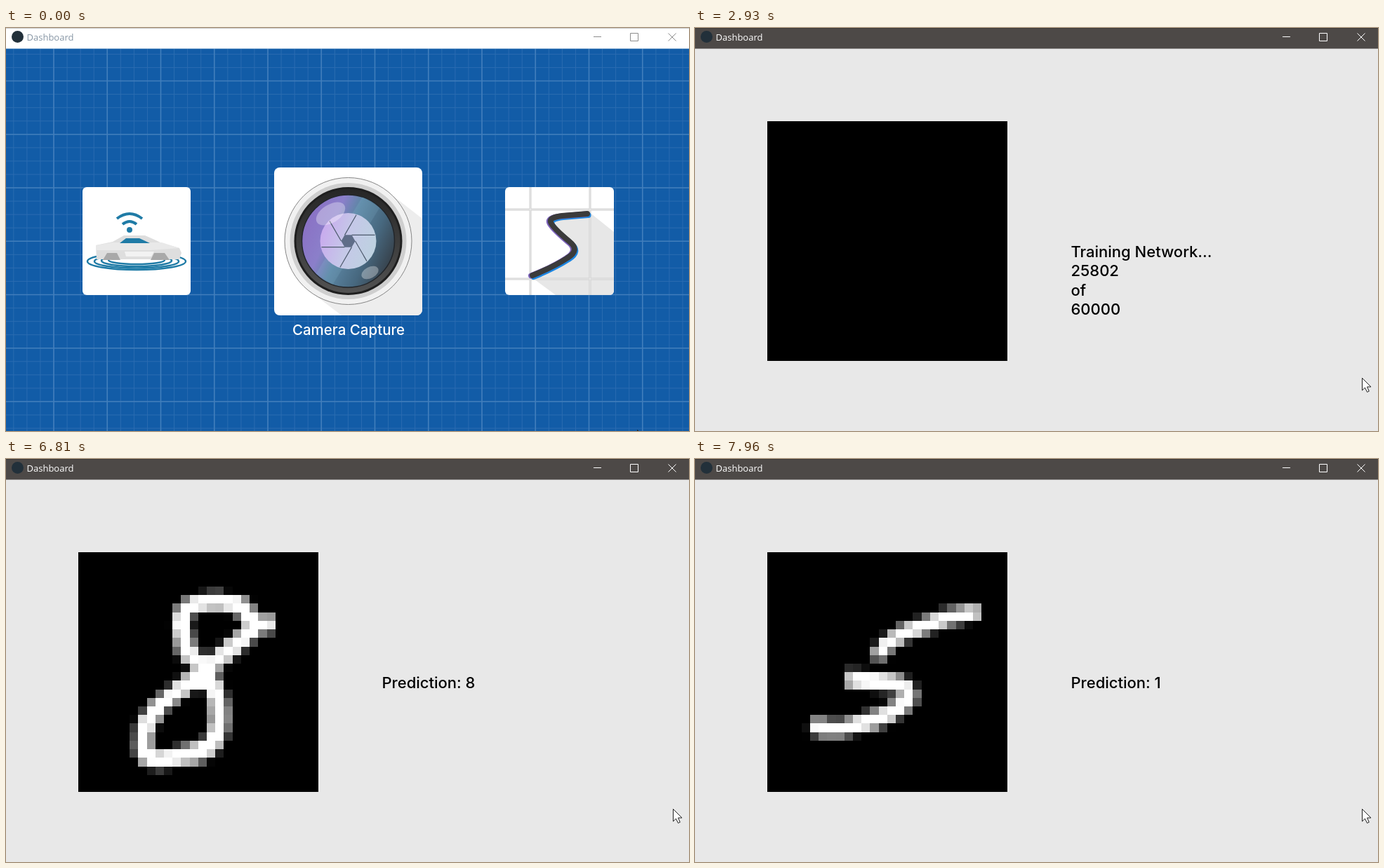
These frames come from a looping animation (973 by 575 pixels, 8000 ms). An HTML page with a canvas:

```html
<!DOCTYPE html>
<html lang="en">
<head>
<meta charset="utf-8">
<title>Dashboard</title>
<style>
  html, body { margin: 0; width: 973px; height: 575px; overflow: hidden; background: #e8e8e8; }
  svg, canvas { position: absolute; display: block; }
  svg { left: 0; top: 0; }
  canvas { left: 103px; top: 133px; }
  text { font: 500 22px Inter, sans-serif; white-space: pre; }
  #title { font: 13px "Open Sans", "Noto Sans", sans-serif; }
  #label { font-size: 20.5px; fill: #fff; text-anchor: middle; }
</style>
</head>
<body>
<svg width="973" height="575" viewBox="0 0 973 575">
  <defs>
    <linearGradient id="lens" x1="0" y1=".3" x2="1" y2=".75">
      <stop offset="0" stop-color="#8a70c4"/><stop offset=".28" stop-color="#8b7fca"/>
      <stop offset=".45" stop-color="#5c86a4"/><stop offset=".72" stop-color="#47687f"/>
      <stop offset="1" stop-color="#343b43"/>
    </linearGradient>
    <linearGradient id="glass" x1="0" y1=".3" x2="1" y2=".6">
      <stop offset="0" stop-color="#c9a9ee"/><stop offset=".5" stop-color="#c5c8e8"/>
      <stop offset="1" stop-color="#bdd2e0"/>
    </linearGradient>
    <linearGradient id="barrel" x2="0" y2="1">
      <stop offset="0" stop-color="#262626"/><stop offset="1" stop-color="#525252"/>
    </linearGradient>
    <clipPath id="cameraClip"><rect x="382" y="199" width="211" height="211" rx="8"/></clipPath>
    <clipPath id="strokeClip"><rect x="711" y="227" width="155" height="154" rx="6"/></clipPath>
    <path id="squiggle" d="M828 265L792 268Q774 270 776 277Q778 284 803 305Q818 317 800 328Q780 341 750 353"
      fill="none" stroke-width="8" stroke-linecap="round" stroke-linejoin="round"/>
  </defs>

  <g id="menu">
    <rect y="29" width="973" height="546" fill="#125ca7"/>
    <path id="minor" stroke="#2b6cb1"/>
    <path id="major" stroke="#417ebc" stroke-width="1.6"/>

    <g class="card">
      <rect x="109" y="227" width="154" height="154" rx="6" fill="#fff"/>
      <g fill="none" stroke="#1f7ba6">
        <g stroke-width="4"><path d="M158 272Q176 258 194 272M166 280Q176 272 186 280"/></g>
        <circle cx="176" cy="288" r="3" fill="#1f7ba6" stroke-width="2"/>
        <g stroke-width="2.5">
          <ellipse cx="186" cy="333" rx="70" ry="12"/><ellipse cx="186" cy="333" rx="60" ry="9.5"/>
          <ellipse cx="186" cy="332" rx="50" ry="8"/><ellipse cx="186" cy="331" rx="40" ry="6"/>
        </g>
      </g>
      <path d="M128 310L152 305 168 296H198Q212 302 222 307L247 314 250 321 247 330H129Z" fill="#dedede"/>
      <path d="M128 310L152 306H222L247 314 206 317H128Z" fill="#e9e9e9"/>
      <path d="M162 307L171 300H190L205 307Z" fill="#1f7ba6"/>
      <path d="M138 331L144 321H158L163 331ZM206 331L211 321H226L233 331Z" fill="#a9a9a9"/>
      <path d="M169 319H211L207 326H171Z" fill="#f2f2f2"/>
    </g>

    <g class="card" clip-path="url(#cameraClip)">
      <rect x="382" y="199" width="211" height="211" fill="#fff"/>
      <path d="M552 240L593 272V410H478L424 369Z" fill="#ededed"/>
      <g transform="translate(487.5 304)">
        <circle r="90.5" fill="#f1f1f1" stroke="#858585"/>
        <circle r="83" fill="#cfcfcf"/>
        <circle r="77" fill="#1f1f1f"/>
        <circle r="74" fill="url(#barrel)"/>
        <circle r="66" fill="url(#lens)" stroke="#22262b" stroke-width="1.5"/>
        <path d="M-46 47L20 -63 45 -48 -22 62Z" fill="#9ad0e2" opacity=".13"/>
        <circle r="40" fill="url(#glass)"/>
        <g id="blades" stroke="#4d5a6c" stroke-width="1.2"></g>
        <path d="M10 0L5 8.7H-5L-10 0 -5 -8.7H5Z" fill="#5f6d88"/>
        <ellipse cx="-25" cy="-39" rx="23" ry="13" transform="rotate(-32 -25 -39)" fill="#fff" opacity=".32"/>
        <ellipse cx="31" cy="45" rx="13" ry="8" transform="rotate(-28 31 45)" fill="#fff" opacity=".32"/>
      </g>
    </g>

    <g class="card" clip-path="url(#strokeClip)">
      <rect x="711" y="227" width="155" height="154" fill="#fff"/>
      <path d="M830 262L866 291V381H783L748 355 812 318 776 275Z" fill="#e7e7e7"/>
      <path d="M747 227V381M832 227V381M711 259H866M711 358H866" stroke="#cfcfcf" stroke-width="3"/>
      <path d="M747 227V381M832 227V381M711 259H866M711 358H866" stroke="#eee"/>
      <use href="#squiggle" x="1.5" y="2" stroke="#1c86e2"/>
      <use href="#squiggle" x="-2" y=".5" stroke="#7d63bd"/>
      <use href="#squiggle" stroke="#3b3b3b"/>
    </g>
    <text id="label" x="488" y="438"></text>
  </g>

  <g id="lines"></g>

  <rect id="bar" width="973" height="29.5"/>
  <path d="M0 .5H973" stroke="#000" opacity=".2"/>
  <circle cx="16.5" cy="12.5" r="8.5" fill="#22303a"/>
  <text id="title" x="29.5" y="18">Dashboard</text>
  <path id="buttons" d="M837 12.5H848M889.5 7.5H900.5V18.5H889.5ZM943.5 7.5L954.5 18.5M954.5 7.5L943.5 18.5" fill="none"/>

  <path id="pointer" d="M.5 .5V18L4.5 14.2 7.5 20.5 10.3 19.2 7.5 13H13Z" fill="#fff" stroke="#222"/>
</svg>
<canvas id="digit" width="342" height="342"></canvas>

<script>
const LOOP = 8000, ACTIVATE = 70, SHIFT = 1070, TRAIN = 2000, TRAINED = 4160, PREDICT = 4310;
const $ = id => document.getElementById(id);
const cards = document.querySelectorAll('.card');

// Centre and size of each card, both as drawn and as carousel slot.
const slots = [[186, 304, 154], [487.5, 304, 211], [788.5, 304, 154]];

// Pen strokes on a 28 by 28 grid: [pen width, path, predicted digit].
const glyphs = {
  sharpSix: [2, 'M20.2 2.2L17 6.5 13.3 10 9.6 14.5Q7.6 17.5 7.6 21.1H10.5Q15 20.8 19 18.6Q22.9 16 22.6 14.6Q22 13.3 19.5 14.2Q16.2 14.8 14.9 17.4', 6],
  boldSix: [2.6, 'M19.2 2.6L14.5 7.2 9 12.6Q6.4 15.5 6.7 18.5Q7 20.6 10 20.8Q16 21.2 19.5 19Q23.5 17 23.2 14.5Q22.8 12.6 20 13.4Q14 15 12.8 16.8L12.5 20', 6],
  eight: [2.1, 'M22.9 8.3L20.5 8.5Q19.5 5.8 17 5.8Q12 5.2 12 8.2Q12 11.5 14.3 13.2Q16.8 16 16.5 20Q16.3 23.3 13 23.6Q7.6 25 7.6 23Q7 20.5 9.3 18L14.5 14 20.8 8.8', 8],
  brokenFive: [1.9, 'M24.8 6.9L21 7.6 16 9.3Q13.2 10.5 12.9 12.4M9.2 14.8L14.8 15.2Q17.2 15.6 16.4 17.4Q14.5 19.5 9.5 20.4Q7.5 21 5.1 20.2', 1],
  zero: [2.2, 'M15 5C5 5 3 24 12 24S23 6 14 5', 0],
  one: [2.1, 'M17 5L11 24', 1],
  two: [2.2, 'M7 8Q11 5 15 6.5Q18 9 12 16Q8 20 5 22Q10 21 22 23.5', 2],
  three: [2.1, 'M8 6Q19 4 17 9Q15 13 11 14Q20 14 17 20Q14 25 6 23', 3],
  four: [2, 'M9 6L7 14Q12 16 19 13M20 5L16 24', 4],
  seven: [2.1, 'M6 8L19 8Q16 16 11 25', 7],
  nine: [2.1, 'M18 8Q10 4 9 11Q11 16 18 9Q17 17 13 24', 9]
};
const slowRun = [[6260, 'zero'], [5560, 'sharpSix'], [5010, 'nine'], [PREDICT, 'two']];
const FAST = 6810, FAST_STEP = 76.67;
const fastRun = ('eight seven four one zero nine three two boldSix seven one ' +
  'four nine zero three brokenFive').split(' ');

const COUNT_STEP = 77.14, COUNT_RATE = 53755 / 25, TOTAL = 60000;

function gridPath(step) {
  let d = '';
  for (let x = 68 % step; x < 973; x += step) d += `M${x} 29.5V575`;
  for (let y = 75.5 % step; y < 575; y += step) if (y > 29.5) d += `M0 ${y}H973`;
  return d;
}
$('minor').setAttribute('d', gridPath(76.25 / 4));
$('major').setAttribute('d', gridPath(76.25));
for (let a = 0; a < 360; a += 60)
  $('blades').innerHTML += `<path d="M10 0L26.5 28.6" transform="rotate(${a})"/>`;

const grid = new OffscreenCanvas(28, 28);
const pen = grid.getContext('2d');
const screen = $('digit').getContext('2d');
pen.strokeStyle = '#fff';
pen.lineJoin = 'round';

function drawDigit(glyph) {
  screen.fillStyle = '#000';
  screen.fillRect(0, 0, 342, 342);
  if (!glyph) return;
  pen.clearRect(0, 0, 28, 28);
  pen.lineWidth = glyph[0];
  pen.stroke(new Path2D(glyph[1]));
  screen.imageSmoothingEnabled = false;
  screen.drawImage(grid, -.2, .2, 342, 342);
}

function glyphAt(t) {
  if (t < PREDICT) return null;
  if (t >= FAST) {
    const i = Math.floor((t - FAST + 5) / FAST_STEP);
    return glyphs[fastRun[Math.min(i, fastRun.length - 1)]];
  }
  return glyphs[slowRun.find(([start]) => t >= start)[1]];
}

function linesAt(t, glyph) {
  if (glyph) return ['Prediction: ' + glyph[2]];
  if (t >= TRAINED) return [];
  const step = Math.floor((t - TRAIN) / COUNT_STEP);
  const counter = step > 0 ? [Math.round(step * COUNT_RATE), 'of', TOTAL] : [];
  return ['Training Network...', ...counter];
}

function movePointer(t) {
  const progress = (start, end) => Math.max(0, Math.min(1, (t - start) / (end - start)));
  let x, y;
  if (t < TRAIN) {
    x = 899;
    y = 573 + 12 * progress(ACTIVATE, 380);
  } else {
    const p = 1 - (1 - progress(2300, 2850)) ** 2;
    x = 925 + 25 * p;
    y = 580 - 81 * p;
  }
  $('pointer').setAttribute('transform', `translate(${x} ${y})`);
}

function drawMenu(t) {
  const shifted = t >= SHIFT;
  cards.forEach((card, i) => {
    const [ox, oy, size] = slots[i];
    const [x, y, slotSize] = slots[(i + (shifted ? 2 : 0)) % 3];
    card.setAttribute('transform',
      `translate(${x} ${y}) scale(${slotSize / size}) translate(${-ox} ${-oy})`);
  });
  $('label').textContent = shifted ? 'Digit Recognition' : 'Camera Capture';
}

function drawTraining(t) {
  const glyph = glyphAt(t);
  drawDigit(glyph);
  $('lines').innerHTML = linesAt(t, glyph)
    .map((line, i) => `<text x="535.5" y="${327 + i * 27.4}">${line}</text>`).join('');
}

function render(now) {
  const t = now % LOOP, active = t >= ACTIVATE, inMenu = t < TRAIN;
  $('bar').setAttribute('fill', active ? '#4d4947' : '#fff');
  $('title').setAttribute('fill', active ? '#fff' : '#8796a5');
  $('buttons').setAttribute('stroke', active ? '#fff' : '#8c8c8c');
  $('menu').style.display = inMenu ? '' : 'none';
  $('lines').style.display = $('digit').style.display = inMenu ? 'none' : '';
  inMenu ? drawMenu(t) : drawTraining(t);
  movePointer(t);
}

const start = performance.now();
function tick() {
  render(performance.now() - start);
  requestAnimationFrame(tick);
}
tick();
</script>
</body>
</html>
```
